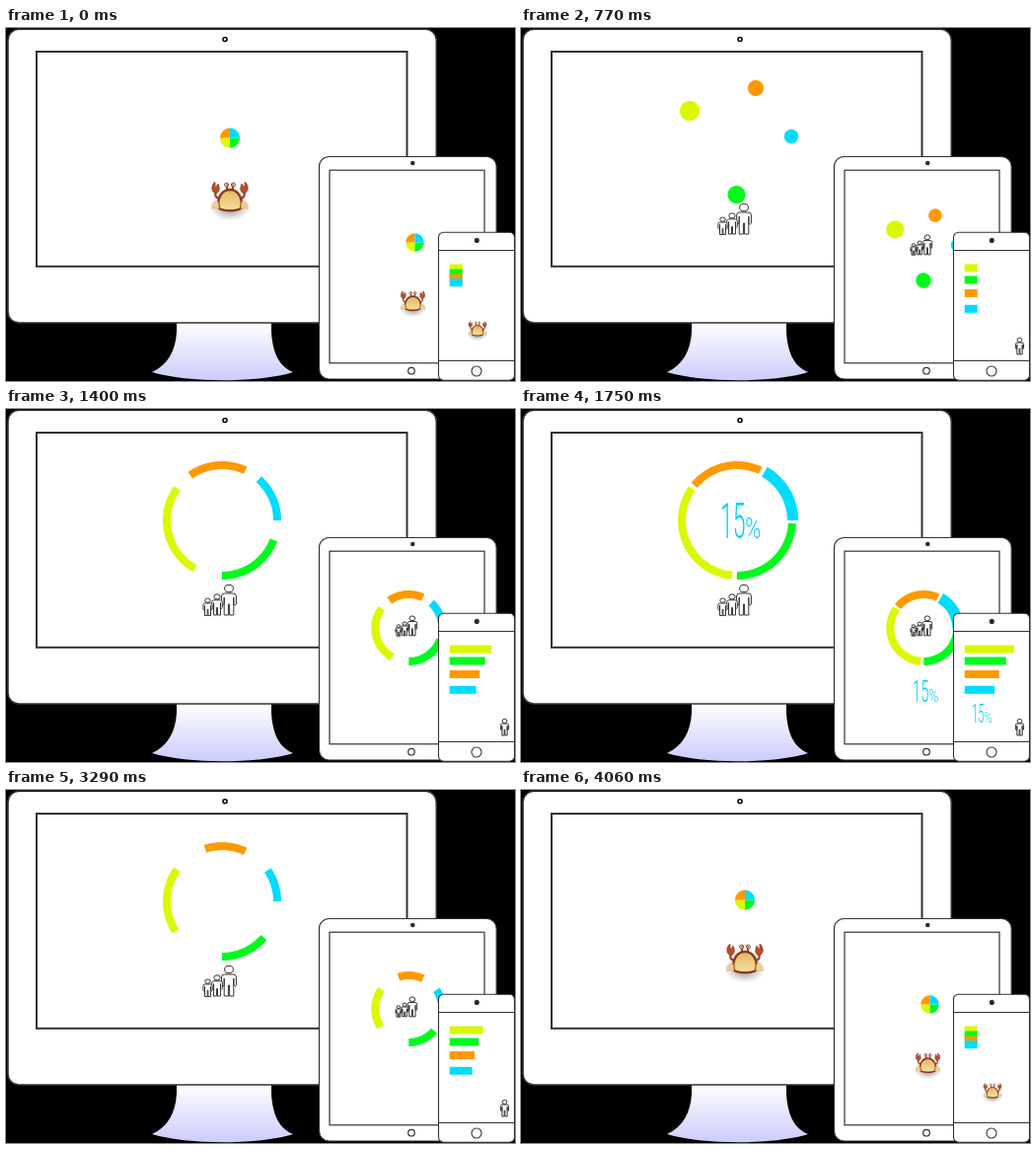
An HTML page that plays this animation: 516 px wide and 358 px high, repeating every 4130 ms.

```html
<!DOCTYPE html>
<html lang="en">
<head>
<meta charset="utf-8">
<title>Responsive charts</title>
<style>
html, body { margin: 0; width: 100%; height: 100%; overflow: hidden; background: #000; }
svg { display: block; width: 516px; height: 358px; }
.num { font-family: Roboto, "Open Sans", sans-serif; font-weight: 300; }
</style>
</head>
<body>
<svg viewBox="0 0 516 358">
  <defs>
    <linearGradient id="metal" x1="0" y1="0" x2="0" y2="1">
      <stop offset="0" stop-color="#fff"/>
      <stop offset="1" stop-color="#ccccfc"/>
    </linearGradient>
    <linearGradient id="shell" x1="0" y1="0" x2="0" y2="1">
      <stop offset="0" stop-color="#e2b765"/>
      <stop offset="1" stop-color="#f8df9d"/>
    </linearGradient>
    <radialGradient id="shade">
      <stop offset="0.45" stop-color="#888" stop-opacity="0.55"/>
      <stop offset="1" stop-color="#999" stop-opacity="0"/>
    </radialGradient>
    <g id="crab">
      <ellipse cx="0" cy="9" rx="21" ry="15" fill="url(#shade)"/>
      <g fill="none" stroke="#a94527" stroke-width="2.2" stroke-linecap="round">
        <path d="M-10 1C-16 0-15-4-14-6M10 1C16 0 15-4 14-6M-3-7V-12M3-7V-12"/>
      </g>
      <path id="claw" fill="#b84e2e" stroke="#7d2f1b" stroke-width=".6"
        d="M-14-4C-20-6-19-13-15-16L-15-10L-12-14C-10-10-10-6-14-4Z"/>
      <use href="#claw" transform="scale(-1 1)"/>
      <g fill="#fff" stroke="#8e3821">
        <circle cx="-3.4" cy="-13" r="2"/><circle cx="3.4" cy="-13" r="2"/>
      </g>
      <g fill="#3b1a10"><circle cx="-3" cy="-13" r=".8"/><circle cx="3" cy="-13" r=".8"/></g>
      <path fill="url(#shell)" stroke="#8e3821" stroke-width="2.4" stroke-linejoin="round"
        d="M-11 11C-14-1-7-8 0-8S14-1 11 11C6 14-6 14-11 11Z"/>
      <path id="foot" fill="#edcf92" stroke="#c9a568" stroke-width=".5"
        d="M-12 4C-17 4-19 8-18 12C-16 9-14 12-11 11Z"/>
      <use href="#foot" transform="scale(-1 1)"/>
    </g>
    <g id="person" fill="#fff" stroke="#333" stroke-linejoin="round">
      <ellipse cx="0" cy="-27" rx="4.4" ry="3.7" vector-effect="non-scaling-stroke"/>
      <path vector-effect="non-scaling-stroke"
        d="M-4.6-22H4.6Q7.4-22 7.4-19V-11Q6-8.5 4.8-11V-18V0H.6V-11H-.6V0H-4.8V-18V-11Q-6-8.5-7.4-11V-19Q-7.4-22-4.6-22Z"/>
    </g>
    <g id="family">
      <use href="#person" transform="translate(226 209)"/>
      <use href="#person" transform="translate(214 209) scale(.72 .69)"/>
      <use href="#person" transform="translate(204.5 209.5) scale(.62 .57)"/>
    </g>
    <g id="label" class="num" fill="#00d0f4">
      <text transform="scale(.46 1)" font-size="50">15</text>
      <text transform="translate(25 0) scale(.74 1)" font-size="30">%</text>
    </g>
  </defs>

  <rect width="516" height="358"/>
  <path fill="url(#metal)" d="M173 298H269V308C270 327 276 343 291 349C256 360 184 360 148 349C164 342 172 327 173 308Z"/>
  <g fill="#fff" stroke="#333">
    <rect x="2" y="1.3" width="434.3" height="297.7" rx="11" stroke-width="1.6"/>
    <rect x="31" y="24" width="375.5" height="217.8" stroke-width="2"/>
    <circle cx="222" cy="11.5" r="2" stroke="#000" stroke-width="1.6"/>
  </g>
  <g id="desktop"></g>
  <g fill="#fff" stroke="#333" stroke-width="1.2">
    <rect x="317.5" y="130.5" width="179.7" height="225.5" rx="10"/>
    <rect x="328" y="144.2" width="157" height="195.6"/>
    <circle cx="412.3" cy="137" r="1.7" fill="#222"/>
    <circle cx="411" cy="347.7" r="3.3"/>
  </g>
  <g id="tablet"></g>
  <g fill="#fff" stroke="#333" stroke-width="1.1">
    <rect x="438.5" y="207.2" width="77" height="150" rx="5"/>
    <path d="M438.5 225.5H515.5M438.5 337.5H515.5"/>
    <circle cx="477.3" cy="215.4" r="2" fill="#222"/>
    <circle cx="477" cy="348" r="5"/>
  </g>
  <g id="phone"></g>
</svg>
<script>
const STEP = 70, LOOP = 4130, OPEN = 490, CLOSE = 2800, LAST = 19;
const NS = 'http://www.w3.org/2000/svg';
const clamp = v => Math.max(0, Math.min(1, v));
const mix = (a, b, k) => a + (b - a) * k;

// Angles in degrees, counterclockwise from east.
const slices = [
  { color: '#dcf800', from: 144.5, span: 120.5, quad: 180, dot: [-48, -29], r: [10, 9], bar: [239.5, 239.5, 50] },
  { color: '#00fa1e', from: 270, span: 87, quad: 270, dot: [-0.5, 56], r: [9, 7.7], bar: [244.5, 251.5, 42] },
  { color: '#ff9900', from: 65, span: 75.5, quad: 90, dot: [19, -52], r: [8, 6.8], bar: [249.5, 265, 35] },
  { color: '#00dcff', from: 0, span: 60.5, quad: 0, dot: [55, -3], r: [7.2, 6.4], bar: [254.2, 280.8, 30.5] }
];

const screens = [
  { id: 'desktop', donut: [219, 113], out: 60, pie: [227, 111.5, 10], k: 1,
    crab: [227, 172, 1], end: [217, 195], people: ['family', ''], label: [202, 131, 1] },
  { id: 'tablet', donut: [408.3, 222], out: 38, pie: [414.5, 217.5, 9.2], k: 0.61,
    crab: [412.5, 277.5, 0.67], end: [407, 220],
    people: ['family', 'translate(265 94) scale(.65)'], label: [397, 297, 0.64] },
  { id: 'phone', crab: [478, 305.5, 0.5], end: [505.3, 323],
    people: ['person', 'translate(505.5 331) scale(.55 .54)'], label: [457, 317.5, 0.5] }
];

function add(parent, tag, attrs) {
  const el = parent.appendChild(document.createElementNS(NS, tag));
  for (const key in attrs) el.setAttribute(key, attrs[key]);
  return el;
}

for (const s of screens) {
  const g = document.getElementById(s.id);
  s.parts = slices.map(d => add(g, s.donut ? 'path' : 'rect', { fill: d.color }));
  s.crabEl = add(g, 'use', { href: '#crab' });
  s.folk = add(g, 'use', { href: '#' + s.people[0], transform: s.people[1] });
  const [x, y, k] = s.label;
  s.text = add(g, 'use', { href: '#label', transform: `translate(${x} ${y}) scale(${k})` });
}

const HALF = 24;
const polar = (c, r, deg) => {
  const a = deg * Math.PI / 180;
  return [c[0] + r * Math.cos(a), c[1] - r * Math.sin(a)];
};

// Outer edge forward, inner edge back.
function outline(point) {
  const pts = [];
  for (let i = 0; i <= HALF; i++) pts.push(point(true, i / HALF));
  for (let i = HALF; i >= 0; i--) pts.push(point(false, i / HALF));
  return pts;
}
const ring = (c, inner, outer, from, span) =>
  outline((out, u) => polar(c, out ? outer : inner, from + span * u));
const disc = (c, r, dir) =>
  outline((out, u) => polar(c, r, out ? dir - 90 + 180 * u : dir + 270 - 180 * u));
const blend = (a, b, k) =>
  a.map((p, i) => [mix(p[0], b[i][0], k), mix(p[1], b[i][1], k)]);
const toPath = pts => 'M' + pts.map(p => p[0].toFixed(2) + ' ' + p[1].toFixed(2)).join('L') + 'Z';

const spread = n => 1 - Math.pow(1 - clamp(n / 5), 1.5);
const growth = n => 1 - Math.pow(1 - clamp((n - 5) / 13), 1.35);

function slicePath(s, d, i, n) {
  const home = [s.donut[0] + d.dot[0] * s.k, s.donut[1] + d.dot[1] * s.k];
  if (s.k < 1) {
    const reach = (s.out - 4) / Math.hypot(...d.dot);
    home[0] = s.donut[0] + d.dot[0] * reach;
    home[1] = s.donut[1] + d.dot[1] * reach;
  }
  const r = d.r[s.k < 1 ? 1 : 0];
  if (n <= 5) {
    const p = spread(n);
    const c = [mix(s.pie[0], home[0], p), mix(s.pie[1], home[1], p)];
    const wedge = ring(c, 0, s.pie[2], d.quad, 90);
    return toPath(blend(wedge, disc(c, r, d.quad + 45), p));
  }
  const lift = n === LAST && i === 3 ? 2.2 : 0;
  const arc = ring(s.donut, s.out - 8 - lift / 2, s.out + lift, d.from, d.span * growth(n));
  return toPath(blend(disc(home, r, d.from), arc, clamp((n - 5) / 3)));
}

function placeBar(el, d, n) {
  const [y0, y1, w] = d.bar;
  el.setAttribute('x', 449.7);
  el.setAttribute('y', mix(y0, y1, spread(n)));
  el.setAttribute('width', mix(13, w, growth(n)));
  el.setAttribute('height', 8);
}

function draw(n) {
  const show = (el, on) => el.setAttribute('visibility', on ? 'visible' : 'hidden');
  for (const s of screens) {
    slices.forEach((d, i) => {
      if (s.donut) s.parts[i].setAttribute('d', slicePath(s, d, i, n));
      else placeBar(s.parts[i], d, n);
    });
    const q = clamp(n / 2), [x, y, k] = s.crab;
    s.crabEl.setAttribute('transform',
      `translate(${mix(x, s.end[0], q)} ${mix(y, s.end[1], q)}) scale(${k})`);
    show(s.crabEl, n < 3);
    show(s.folk, n >= 3);
    show(s.text, n === LAST);
  }
}

function stage(t) {
  if (t < OPEN) return 0;
  if (t < CLOSE) return Math.min(LAST, Math.floor((t - OPEN) / STEP) + 1);
  return Math.max(0, LAST - 1 - Math.floor((t - CLOSE) / STEP));
}

const start = performance.now();
let shown = -1;
function tick() {
  const n = stage((performance.now() - start) % LOOP);
  if (n !== shown) draw(shown = n);
  requestAnimationFrame(tick);
}
tick();
</script>
</body>
</html>
```
